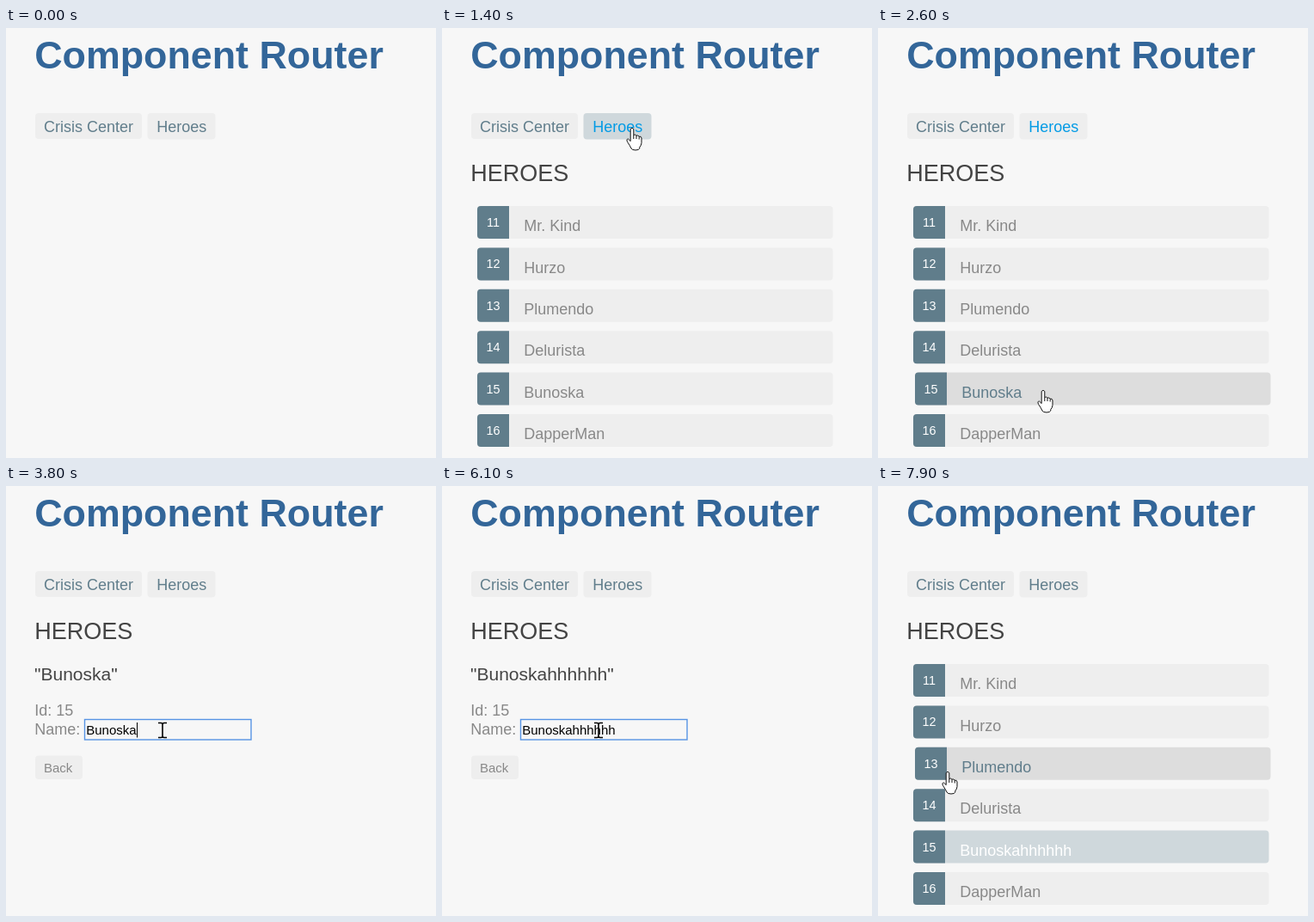
Recreate the animation shown at these times as an HTML page. Size 500x500 px, loop 8000 ms.

```html
<!DOCTYPE html>
<html lang="en">
<head>
<meta charset="utf-8">
<title>Component Router</title>
<style>
  html, body { margin: 0; width: 100%; height: 100%; overflow: hidden; background: #f7f7f7; }
  svg { display: block; width: 500px; height: 500px; font: 18px "Liberation Sans", Arial, sans-serif; fill: #888; }
  .title { font-size: 44.8px; font-weight: bold; fill: #369; }
  .h2 { font-size: 27px; fill: #444; }
  .h3 { font-size: 21px; fill: #444; }
  .box { fill: #eee; }
  .nav text { fill: #607d8b; }
  .nav.on text, .nav.hover text { fill: #039be5; }
  .nav.hover .box, .back.hover .box { fill: #cfd8dc; }
  .row .badge { fill: #607d8b; }
  .row .num { font-size: 14.4px; fill: #fff; text-anchor: middle; }
  .row.selected .box { fill: #cfd8dc; }
  .row.selected .name { fill: #fff; }
  .row.hover .box { fill: #ddd; }
  .row.hover .name { fill: #607d8b; }
  .back text { font-size: 15px; }
  .ring { fill: none; stroke: #6a94d4; stroke-width: 1.5; visibility: hidden; }
  .back.focus .ring { visibility: visible; }
  .field rect { fill: #f7f7f7; stroke: #c4c4c4; }
  .field text { font-size: 15px; fill: #000; }
  .field.focus rect { stroke: #5794e4; stroke-width: 1.4; }
  .pointer { fill: #fff; stroke: #111; stroke-linejoin: round; }
</style>
</head>
<body>
<svg viewBox="0 0 500 500">
  <text class="title" x="33.2" y="47.4">Component Router</text>
  <g class="nav">
    <rect class="box" x="34" y="99" width="124" height="30" rx="4"/>
    <text x="44.1" y="121">Crisis Center</text>
  </g>
  <g class="nav" id="heroes">
    <rect class="box" x="164.5" y="99" width="79" height="30.5" rx="4"/>
    <text x="175.2" y="121">Heroes</text>
  </g>
  <text class="h2" id="heading" x="33.2" y="178">HEROES</text>
  <g id="list"></g>
  <g id="detail">
    <text class="h3" id="quoted" x="33" y="225.5"></text>
    <text x="33.2" y="267">Id: 15</text>
    <text x="33.2" y="289">Name:</text>
    <g class="field" id="field">
      <rect x="91.5" y="271.5" width="193.5" height="23.5"/>
      <text id="typed" x="93.2" y="289"></text>
      <path id="caret" d="M0 275V292.5" stroke="#000"/>
    </g>
    <g class="back" id="back">
      <rect class="box" x="34" y="313.5" width="55" height="27.5" rx="4"/>
      <rect class="ring" x="33" y="312.5" width="57" height="29.5" rx="4"/>
      <text x="44" y="332.5">Back</text>
    </g>
  </g>
  <g id="cursor">
    <path class="pointer" id="arrow" d="M0 0V17.5L4 13.8 6.8 20 9.6 18.8 6.9 12.8H12.3Z"/>
    <path class="pointer" id="hand" d="M-1.8 1.5Q0-1 1.8 1.5V8.5Q3.7 7.2 5 9.2Q7 8.2 8.2 10.2Q10.6 9.5 11 12V17.5Q10.8 20.5 8.8 22.5V24Q8 26 4 26Q0 26-1 24Q-2.5 20.5-5.4 16.5Q-7 13-4.5 13L-1.8 15.6ZM1.8 8.5V13M5 9.2V13M8.2 10.2V13.5"/>
    <path id="beam" d="M-5-8.5H-2Q0-8.5 0-6.5Q0-8.5 2-8.5H5M0-7V7M-5 8.5H-2Q0 8.5 0 6.5Q0 8.5 2 8.5H5" fill="none" stroke="#000" stroke-width="1.6"/>
  </g>
</svg>
<script>
const LOOP = 8000, STEP = 100;
const LIST_AT = 1400, DETAIL_AT = 3000, RETURN_AT = 7500;
const FOCUS_AT = 3800, PRESS_AT = 7300;
const PICK = 4, ROW_TOP = 207, ROW_GAP = 48.4, ROW_H = 38;
const names = ["Mr. Kind", "Hurzo", "Plumendo", "Delurista", "Bunoska", "DapperMan"];

// start, end, from x, from y, to x, to y, vertical ease-out power
const moves = [
  [500, 1000, 450, 250, 221, 116, 1.2],
  [1600, 2500, 221, 116, 190, 413, 1.55],
  [2500, 2600, 190, 413, 192, 421, 1],
  [3100, 3700, 192, 421, 182, 284, 1.4],
  [6500, 7200, 182, 284, 68, 325, 1.4],
  [7700, 7900, 68, 325, 81, 332, 1]
];
const keyTimes = [4600, 4900, 5000, 5400, 5500, 5600];
const echoTimes = [4800, 5000, 5300, 5500, 5700, 5800];
const blinks = [[4400, 4600], [6100, 6600], [7100, 7600]];

const $ = id => document.getElementById(id);
const show = (el, on) => { el.style.display = on ? "" : "none"; };
const within = (p, x, y, w, h) => p.x >= x && p.x <= x + w && p.y >= y && p.y <= y + h;
const nameAt = (t, times) => names[PICK] + "h".repeat(times.filter(k => t >= k).length);

$("list").innerHTML = names.map((name, i) => `
  <g class="row" transform="translate(41 ${ROW_TOP + i * ROW_GAP})">
    <rect class="box" width="413.5" height="${ROW_H}" rx="4"/>
    <path class="badge" d="M4 0H37V${ROW_H}H4Q0 ${ROW_H} 0 ${ROW_H - 4}V4Q0 0 4 0Z"/>
    <text class="num" x="18.5" y="24">${11 + i}</text>
    <text class="name" x="54.2" y="29.3">${name}</text>
  </g>`).join("");
const rows = [...document.querySelectorAll(".row")];

function pointerAt(t) {
  const [start, end, x0, y0, x1, y1, power] = moves.filter(m => t >= m[0]).pop() || moves[0];
  const k = Math.max(0, Math.min(1, (t - start) / (end - start)));
  return { x: x0 + (x1 - x0) * k, y: y0 + (y1 - y0) * (1 - (1 - k) ** power) };
}

function drawList(t, p) {
  const back = t >= RETURN_AT;
  let hit = false;
  rows.forEach((row, i) => {
    const top = ROW_TOP + i * ROW_GAP;
    const hover = within(p, 41, top, 414, ROW_H);
    hit = hit || hover;
    row.classList.toggle("hover", hover);
    row.classList.toggle("selected", back && i === PICK);
    row.setAttribute("transform", `translate(${hover ? 43 : 41} ${top})`);
  });
  rows[PICK].querySelector(".name").textContent = back ? nameAt(t, keyTimes) : names[PICK];
  return hit;
}

function drawDetail(t, p) {
  const focus = t >= FOCUS_AT && t < PRESS_AT;
  const overBack = within(p, 34, 313, 55, 28);
  $("quoted").textContent = `"${nameAt(t, echoTimes)}"`;
  $("typed").textContent = nameAt(t, keyTimes);
  $("field").classList.toggle("focus", focus);
  show($("caret"), focus && !blinks.some(([a, b]) => t >= a && t < b));
  const end = 93.2 + $("typed").getComputedTextLength();
  $("caret").setAttribute("transform", `translate(${Math.round(end) + .5} 0)`);
  $("back").classList.toggle("hover", overBack);
  $("back").classList.toggle("focus", t >= PRESS_AT);
  return overBack;
}

function render(t) {
  const p = pointerAt(t);
  const detail = t >= DETAIL_AT && t < RETURN_AT;
  const list = t >= LIST_AT && !detail;
  const overNav = within(p, 165, 99, 78, 30);
  show($("heading"), t >= LIST_AT);
  show($("list"), list);
  show($("detail"), detail);
  $("heroes").classList.toggle("hover", overNav);
  $("heroes").classList.toggle("on", list && t < DETAIL_AT);

  const overItem = list ? drawList(t, p) : detail && drawDetail(t, p);
  const shape = overNav || overItem ? "hand"
    : detail && within(p, 91, 271, 195, 25) ? "beam" : "arrow";
  for (const id of ["arrow", "hand", "beam"]) show($(id), id === shape);
  show($("cursor"), t >= 600);
  $("cursor").setAttribute("transform", `translate(${p.x} ${p.y})`);
}

const began = performance.now();
function tick() {
  const t = (performance.now() - began) % LOOP;
  render(Math.floor(t / STEP) * STEP);
  requestAnimationFrame(tick);
}
tick();
</script>
</body>
</html>
```
